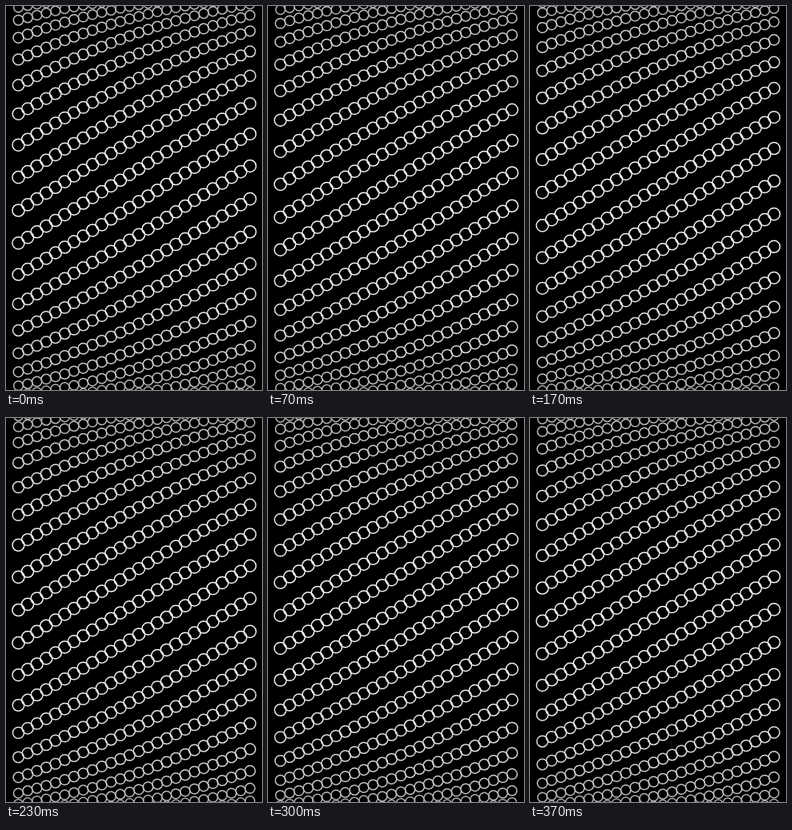
An HTML page with a canvas for the animation above (0.41 s loop, 320x480 px).

```html
<!DOCTYPE html>
<html lang="en">
<head>
<meta charset="utf-8">
<title>Rolling rings</title>
<style>
  html, body { margin: 0; width: 100%; height: 100%; overflow: hidden; background: #000; }
  canvas { display: block; }
</style>
</head>
<body>
<canvas id="stage" width="320" height="480"></canvas>
<script>
const ctx = document.getElementById('stage').getContext('2d');
const LOOP = 410;
const STARTS = [0, 30, 70, 100, 140, 170, 200, 230, 270, 300, 330, 370];
const COLS = 26, GAP = 2 * Math.PI / 38, RADIUS = 250;
const TWIST = 4.348 / 25;  // rows climbed per column
const PHASE = 0.375;

function ring(x, angle) {
  const depth = Math.cos(angle);
  const grey = 150 + 95 * depth;
  ctx.strokeStyle = `rgb(${grey}, ${grey}, ${grey})`;
  ctx.beginPath();
  ctx.arc(x, 240 + RADIUS * Math.sin(angle), 5 + 2.6 * depth, 0, 2 * Math.PI);
  ctx.stroke();
}

function draw(turn) {
  ctx.fillStyle = '#000';
  ctx.fillRect(0, 0, 320, 480);
  ctx.lineWidth = 1.5;
  for (let col = 0; col < COLS; col++) {
    const shift = PHASE + turn - col * TWIST;
    for (let row = -14; row <= 14; row++) {
      const angle = (row + shift) * GAP;
      if (Math.abs(angle) < Math.PI / 2) ring(15.5 + col * 11.58, angle);
    }
  }
}

function tick() {
  const t = performance.now() % LOOP;
  const step = STARTS.filter(s => s <= t).length - 1;
  // the opening step is half as long again, the closing one half as long
  draw(step ? (step + 0.5) / 12 : 0);
  requestAnimationFrame(tick);
}
tick();
</script>
</body>
</html>
```
